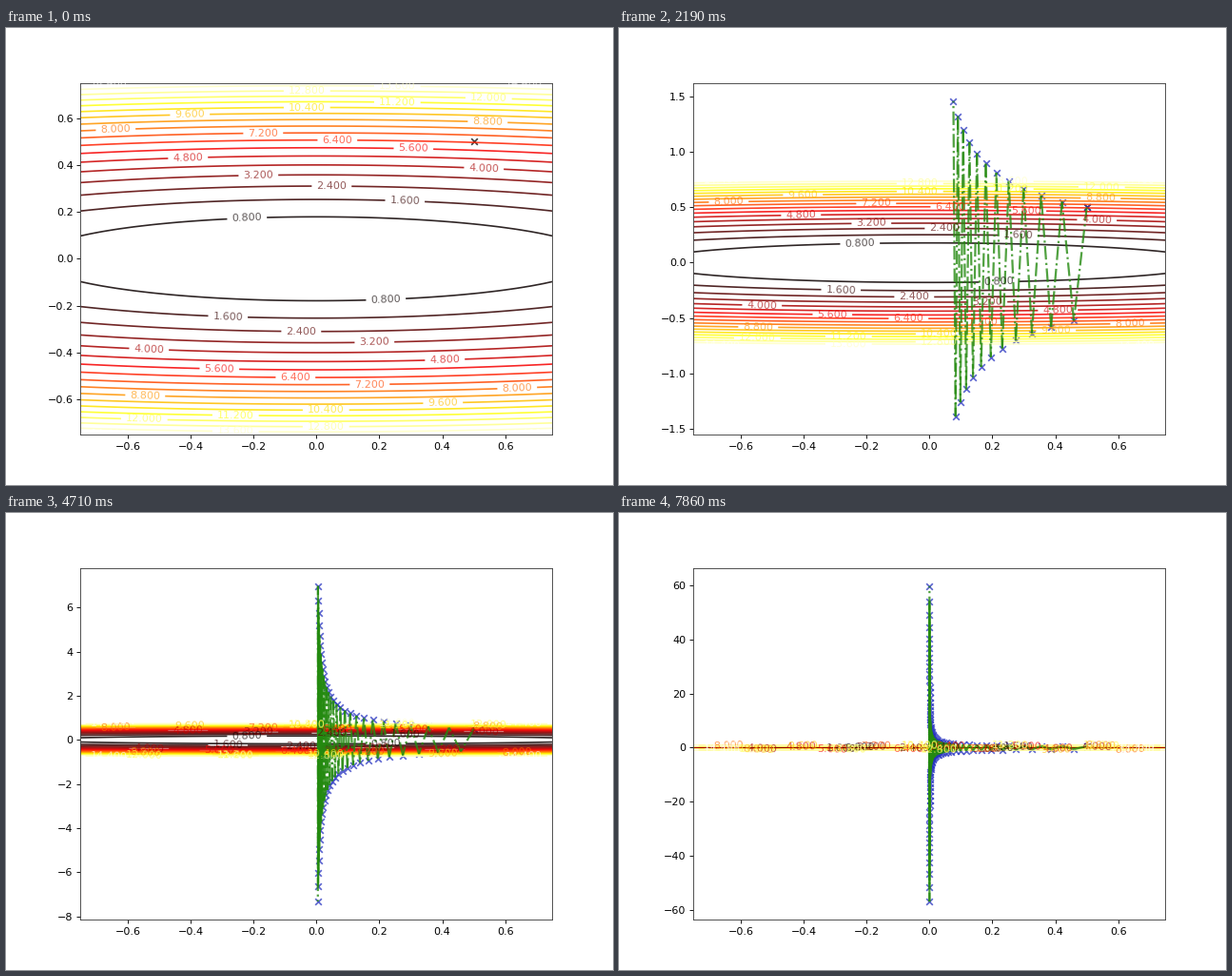
Write a matplotlib script that moves like this. It is 638 px wide and 480 px high and loops after 7.89 s.

```python
import numpy as np
import matplotlib.pyplot as plt
from matplotlib.animation import FuncAnimation
from matplotlib.collections import LineCollection

W, H, DPI = 638, 480, 80
FRAMES, INTERVAL = 263, 30
BOX = (78.3, 52.8, 496, 369.6)
EDGE = 0.75
RATE = 0.041
STEPS = 98
MARK_R = 2.48  # marker half-size in px, counted in the y limits
BLUE, GREEN = "#2430c0", "#248a10"


def bowl(x, y):
    return x ** 2 + 25 * y ** 2


def descend():
    k = np.arange(STEPS + 1)
    return np.column_stack([0.5 * (1 - 2 * RATE) ** k,
                            0.5 * (1 - 50 * RATE) ** k])


def view_limits(ys):
    """Autoscaled y limits after each step; the contour edge takes no margin."""
    lo, hi, span, views = -EDGE, EDGE, 2 * EDGE, []
    for y in ys:
        r = MARK_R / BOX[3] * span
        lo, hi = min(lo, y - r), max(hi, y + r)
        pad = 0.05 * (hi - lo)
        view = (lo - pad * (lo < -EDGE), hi + pad * (hi > EDGE))
        span = view[1] - view[0]
        views.append(view)
    return views


def label_spots(levels):
    cols = [253, 419, 342, 265, 502, 191, 428, 348, 270,
            115, 506, 193, 316, 411, 507, 316, 411]
    spots = []
    for level, col in zip(levels, cols):
        x = (col - 326) / (BOX[2] / (2 * EDGE))
        y = np.sqrt((level - x * x) / 25)
        spots += [(x, y), (-x, -y)]
    x = 0.66
    y = np.sqrt((levels[-1] - x * x) / 25)
    return spots + [(sx * x, sy * y) for sx in (-1, 1) for sy in (-1, 1)]


fig = plt.figure(figsize=(W / DPI, H / DPI), dpi=DPI, facecolor="white")
ax = fig.add_axes([BOX[0] / W, BOX[1] / H, BOX[2] / W, BOX[3] / H])
ax.set(xlim=(-EDGE, EDGE), ylim=(-EDGE, EDGE))
plt.setp(list(ax.spines.values()), color="0.25")

grid = np.linspace(-EDGE, EDGE, 150)
gx, gy = np.meshgrid(grid, grid)
levels = 0.8 * np.arange(1, 19)
rings = ax.contour(gx, gy, bowl(gx, gy), levels=levels, cmap="hot", alpha=0.85)
ax.set(xlim=(-EDGE, EDGE), ylim=(-EDGE, EDGE))
labels = ax.clabel(rings, inline=True, fontsize=10, fmt="%1.3f",
                   manual=label_spots(levels))
plt.setp(list(rings.labelTexts), alpha=0.65)

path = descend()
views = view_limits(path[:, 1])
legs = np.stack([path[:-1], path[1:]], axis=1)

mark = dict(marker="x", s=36, linewidths=1.5, alpha=0.75, zorder=1)
ax.scatter(*path[0], color="k", **mark)
dots = ax.scatter([], [], color=BLUE, **mark)
trail = LineCollection([], colors=GREEN, linestyles="-.", linewidths=2,
                       alpha=0.8, zorder=2)
ax.add_collection(trail, autolim=False)

# the descent starts after a pause and then runs at a slightly uneven pace
pace = np.interp(np.arange(FRAMES),
                 [17, 52, 93, 124, 157, 196, 262],
                 [0, 14.3, 30.5, 41.5, 55.5, 71.5, 98.5]).astype(int)


def update(i):
    n = pace[i]
    dots.set_offsets(path[:n + 1] if n else path[:0])
    trail.set_segments(legs[:n])
    ax.set_xlim(-EDGE, EDGE)
    ax.set_ylim(*views[n])
    return dots, trail


anim = FuncAnimation(fig, update, frames=FRAMES, interval=INTERVAL,
                     repeat=True, repeat_delay=0, blit=False)
plt.show()
```
